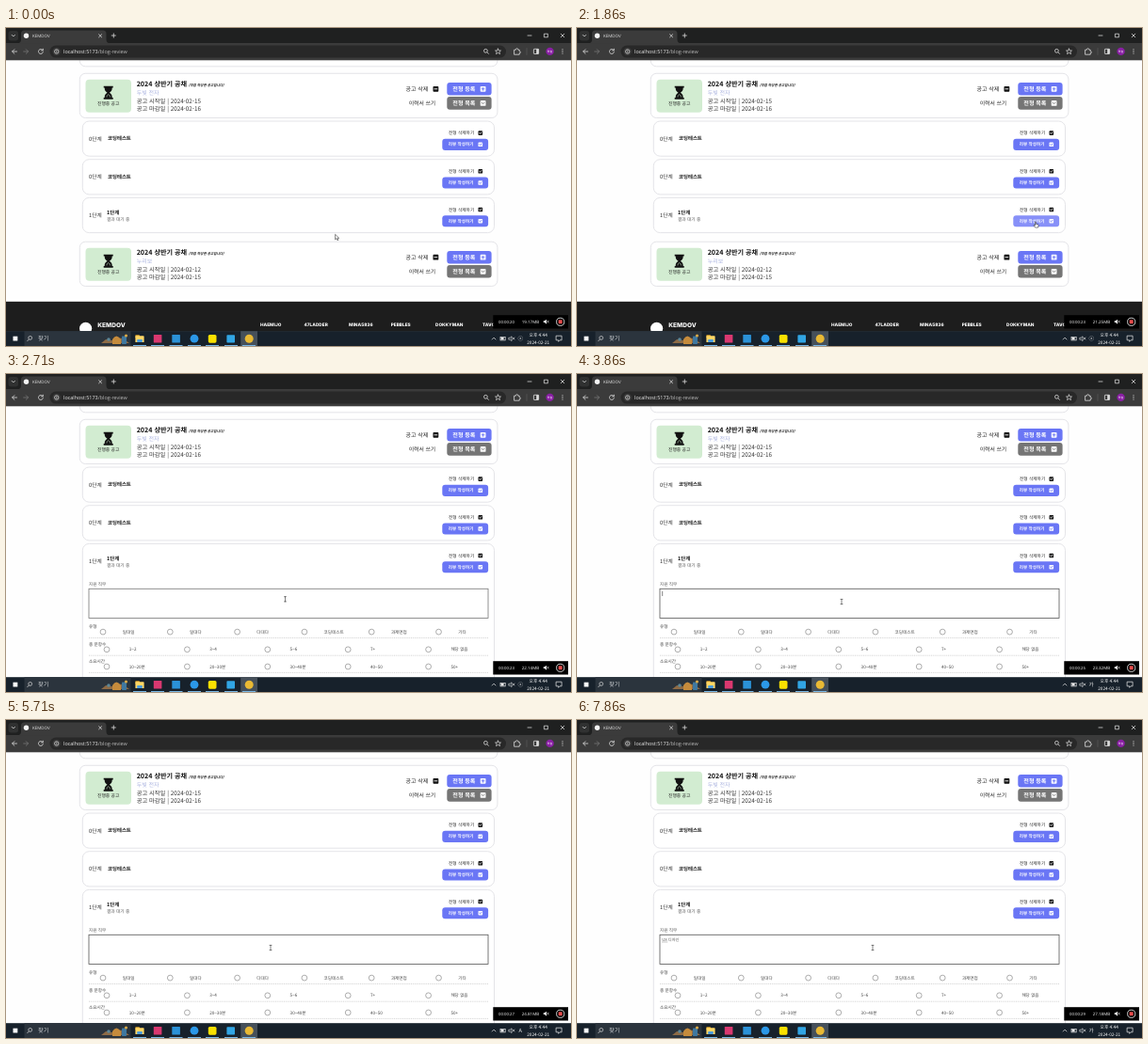
Recreate the animation shown at these times as an HTML page. Size 600 by 338 pixels, loop 8 s.

```html
<!DOCTYPE html>
<html lang="ko">
<head>
<meta charset="utf-8">
<title>Blog review</title>
<style>
html, body { margin: 0; width: 100%; height: 100%; overflow: hidden; background: #fefefe; }
svg { display: block; width: 100%; height: 100%; font-family: 'Noto Sans CJK KR', 'Noto Sans CJK', 'Noto Sans', sans-serif; }
text { white-space: pre; text-rendering: geometricPrecision; }
.inter { font-family: Inter, sans-serif; }
.ui { font-family: 'Open Sans', 'Noto Sans CJK KR', sans-serif; }
</style>
</head>
<body>
<svg id="stage" viewBox="0 0 600 338"></svg>
<script>
const BLUE = '#6a76f5', GREY = '#757575', INK = '#222', LINE = '#dedee2';
const FRAME = 1000 / 7, LOOP = 8000;

// Drawing helpers; text is centred vertically on y.
const text = (x, y, str, size, fill = INK, attrs = '') =>
  `<text x="${x}" y="${y + size * 0.36}" font-size="${size}" fill="${fill}" ${attrs}>${str}</text>`;
const rect = (x, y, w, h, fill, r = 0, attrs = '') =>
  `<rect x="${x}" y="${y}" width="${w}" height="${h}" rx="${r}" fill="${fill}" ${attrs}/>`;
const circle = (x, y, r, fill, attrs = '') =>
  `<circle cx="${x}" cy="${y}" r="${r}" fill="${fill}" ${attrs}/>`;
const line = (d, color = '#ddd', width = 0.8) =>
  `<path d="${d}" fill="none" stroke="${color}" stroke-width="${width}" stroke-linecap="round" stroke-linejoin="round"/>`;
const group = (id, body, attrs = '') => `<g id="${id}" ${attrs}>${body}</g>`;
const bold = 'font-weight="700"', medium = 'font-weight="500"', middle = 'text-anchor="middle"';
const border = `stroke="${LINE}" stroke-width=".8"`;

function icon(cx, cy, size, kind, box, ink) {
  const s = size / 2, k = s * 0.5;
  const marks = {
    minus: `M${cx - k} ${cy}h${2 * k}`,
    plus: `M${cx - k} ${cy}h${2 * k}M${cx} ${cy - k}v${2 * k}`,
    down: `M${cx - k} ${cy - k / 2}l${k} ${k}l${k} ${-k}`,
    check: `M${cx - k} ${cy}l${k * 0.7} ${k * 0.7}l${k * 1.3} ${-k * 1.4}`
  };
  return rect(cx - s, cy - s, size, size, box, 0.9) + line(marks[kind], ink, 0.9);
}

function bigButton(y, label, fill, kind) {
  return rect(468.3, y, 47.3, 13.6, fill, 3) +
    text(474.3, y + 6.8, label, 6.1, '#fff', bold) +
    icon(506.6, y + 6.8, 5.8, kind, '#fff', fill);
}

function postingCard(y, company, start, end) {
  const body = rect(78.3, 0, 443.6, 47.2, '#fff', 6, border) +
    rect(84.5, 6.5, 48.5, 35, '#d2ecd1', 4) +
    '<path d="M103.7 13.5h10v1.8h-1c0 3-1 4-2.8 5.2 1.8 1.2 2.8 2.2 2.8 5.2h1v1.8h-10v-1.8h1c0-3 1-4 2.8-5.2-1.8-1.2-2.8-2.2-2.8-5.2h-1z" fill="#111"/>' +
    line('M107 24.8c0-1.4.8-1.8 1.7-2.5.9.7 1.7 1.1 1.7 2.5', '#d2ecd1', 0.6) +
    text(108.7, 32, '진행중 공고', 4.8, INK, `${medium} ${middle}`) +
    text(138.7, 11.2, '2024 상반기 공채', 7.1, '#111', bold) +
    text(194, 12.3, '(직접 작성한 공고입니다)', 3.55, '#111', `${bold} font-style="italic"`) +
    text(138.7, 21, company, 6, '#aab3df') +
    text(138.7, 29.8, `공고 시작일 | ${start}`, 6.3, '#333') +
    text(138.7, 37.9, `공고 마감일 | ${end}`, 6.3, '#333') +
    text(424.6, 16.5, '공고 삭제', 6, INK, medium) +
    icon(456.4, 16.5, 5.8, 'minus', '#111', '#fff') +
    text(427.7, 31.6, '이력서 쓰기', 5.85, INK, medium) +
    bigButton(9.7, '전형 등록', BLUE, 'plus') +
    bigButton(24.8, '전형 목록', GREY, 'down');
  return `<g transform="translate(0 ${y})">${body}</g>`;
}

function stageRow(y, step, title, note = '', buttonId = '') {
  const titleY = note ? 15.2 : 18;
  return `<g transform="translate(0 ${y})">` +
    text(88, 18.5, step, 5.7, '#333') +
    text(note ? 107 : 108, titleY, title, 5.4, '#111', bold) +
    text(107, 23.2, note, 4.7, '#555') +
    text(470, 12.6, '전형 삭제하기', 4.7, INK, medium) +
    icon(503.8, 12.6, 4.6, 'check', '#111', '#fff') +
    rect(463.3, 18.8, 48.8, 12.1, BLUE, 3, `id="${buttonId || 'review' + Math.round(y)}"`) +
    text(469.8, 24.8, '리뷰 작성하기', 4.6, '#fff', bold) +
    icon(503.8, 24.8, 4.6, 'check', '#fff', BLUE) + '</g>';
}

function radioRow(y, label, firstX, step, options) {
  const choices = options.map((name, i) => {
    const x = firstX + i * step;
    return circle(x, y + 5.8, 2.9, '#fff', 'stroke="#777" stroke-width=".6"') +
      text(x + (step < 80 ? 20.7 : 23.8), y + 5.8, name, 4.6, '#444');
  }).join('');
  return text(88, y, label, 4.65, '#444') + choices +
    `<path d="M88 ${y + 12.2}H512" stroke="#bbb" stroke-width=".6" stroke-dasharray="1 .8"/>`;
}

const footer = () => {
  const users = [[270, 'HAEMIJO'], [316.5, '47LADDER'], [364, 'MINA5836'], [408.7, 'PEBBLES'], [456, 'DOKKYMAN'], [506, 'TAVOKI']];
  return rect(0, 290.8, 600, 32, '#1d1d1d') + circle(84.6, 319.3, 6.6, '#fff') +
    text(97.3, 315.8, 'KEMDOV', 6.5, '#fff', 'class="inter" font-weight="800"') +
    users.map(([x, name]) => text(x, 315.6, name, 4.75, '#fff', 'class="inter" font-weight="800"')).join('');
};

const closedView = () =>
  rect(81.3, 180.4, 437.2, 37.2, '#fff', 7, border) +
  postingCard(227.2, '누리보', '2024-02-12', '2024-02-15') + footer();

const openView = () =>
  rect(81.3, 180.4, 437.2, 200, '#fff', 7, border) +
  text(88, 223.5, '지원 직무', 4.6, '#555') +
  rect(88, 228.3, 424, 31.2, '#fff', 0, 'stroke="#777" stroke-width=".8" id="box"') +
  radioRow(268.3, '유형', 103, 71.3, ['일대일', '일대다', '다대다', '코딩테스트', '과제면접', '기타']) +
  radioRow(287, '총 문항수', 107, 85.4, ['1~2', '3~4', '5~6', '7+', '해당 없음']) +
  radioRow(305.2, '소요시간', 107, 85.4, ['10~20분', '20~30분', '30~40분', '40~50', '50+']) +
  group('typed', text(90.3, 233.3, '', 4.2, '#555')) +
  group('squiggle', line('M90.4 236h5.5', '#888', 0.5)) +
  group('caret', line('M90.7 231.2v4.4', '#333', 0.6));

const browser = () =>
  rect(0, 0, 600, 17, '#1f2020') + rect(0, 16, 600, 18.3, '#3b3b3b') +
  '<path d="M12 16.2q4 0 4-4V6q0-3.5 3.5-3.5H103q3.5 0 3.5 3.5v6.2q0 4 4 4z" fill="#3b3b3b"/>' +
  rect(2.5, 3, 10.6, 10.4, '#303131', 3) + line('M6.2 7.4l1.6 1.6 1.6-1.6') +
  circle(21.5, 8.3, 2.7, '#f2f2f2') + text(28, 8.3, 'KEMDOV', 4.5, '#e6e6e6', 'class="ui"') +
  line('M98.6 6.8l3 3m0-3l-3 3M112.2 8h4.2m-2.1-2.1v4.2') +
  line('M554 8h4M571.8 6.2h3.6v3.6h-3.6zM589.2 6.2l3.6 3.6m0-3.6l-3.6 3.6', '#eee', 0.7) +
  line('M11.5 25H6.7m2.2-2.3L6.6 25l2.3 2.3') +
  line('M18.7 25h4.8m-2.2-2.3l2.3 2.3-2.3 2.3', '#777') +
  line('M39 23.5a2.5 2.5 0 1 0 .4 2.1M39.3 22.2v1.7h-1.7') +
  rect(46.5, 18.6, 484.5, 12.9, '#282828', 6.4) + circle(53.7, 25, 4.2, '#3b3b3b') +
  circle(53.7, 25, 2.2, 'none', 'stroke="#ddd" stroke-width=".7"') + line('M53.7 24.8v1.2M53.7 23.8v.1', '#ddd', 0.6) +
  text(61, 25, 'localhost:5173<tspan fill="#bbb">/blog-review</tspan>', 5.45, '#eee', 'class="ui"') +
  circle(509.4, 24.3, 1.9, 'none', 'stroke="#ddd" stroke-width=".8"') + line('M510.9 25.8l1.6 1.6') +
  line('M522.5 22l.9 2h2.1l-1.6 1.4.6 2.2-2-1.2-2 1.2.6-2.2-1.6-1.4h2.1z', '#ddd', 0.7) +
  line('M540 23.2h1.4q0-1.5 1.2-1.5t1.2 1.5h1.4v1.6q1.2 0 1.2 1t-1.2 1v1.4H540z') +
  line('M553 21.5v7', '#666', 0.5) +
  rect(560.4, 22.3, 5.2, 5.2, 'none', 0.6, 'stroke="#ddd" stroke-width=".8"') + rect(563.2, 22.3, 2.4, 5.2, '#ddd') +
  circle(577.6, 24.9, 4.2, '#8a1fa5') + text(577.6, 24.9, '하늘', 3, '#fff', middle) +
  [22.8, 24.9, 27].map(y => circle(591, y, 0.6, '#ddd')).join('');

const taskbar = () => {
  const underlines = [142, 161, 180.5, 200, 219, 239, 258].map(x => rect(x - 7, 337, 14, 1, '#79b7e6')).join('');
  return rect(0, 322.2, 600, 16, '#17212b') + rect(19.5, 322.2, 113, 16, '#2b343d') +
    rect(7.5, 327.7, 4.8, 4.8, '#fff') +
    circle(25.7, 329.4, 1.9, 'none', 'stroke="#ddd" stroke-width=".7"') + line('M24.4 330.9l-1.7 1.8', '#ddd', 0.7) +
    text(34, 330, '찾기', 6.2, '#d2d5d8') +
    '<path d="M101 335l5-4 7 1 4-3 7 1 7 5z" fill="#8d6b46"/><path d="M113 336v-5q4-7 9 0v5z" fill="#c58b3c"/>' +
    rect(123, 327.5, 5, 8.5, '#3f78a0', 0.8) + circle(109, 331, 1.8, '#5c8798') + circle(127.5, 327, 1.6, '#d8a848') +
    rect(249.2, 322.2, 17.8, 16, '#46505a') + underlines +
    rect(137.4, 326.3, 4.5, 3, '#e3a92c', 0.5) + rect(137.4, 327.3, 9.2, 6.7, '#ffd766', 0.6) + rect(139.2, 331, 5.6, 3, '#4b9dde', 0.4) +
    rect(156.8, 326, 8.6, 8.6, '#d93870', 0.6) + rect(176.3, 326, 8.6, 8.6, '#2b92d8', 0.6) +
    circle(200, 330.2, 4.4, '#2b98e8') + rect(214.8, 326, 8.7, 8.7, '#fae100', 1.6) +
    rect(234.4, 326.2, 8.6, 8.4, '#31a5e4', 0.8) + circle(258.2, 330.2, 4.5, '#e9b934') +
    line('M516.2 331l1.9-1.9 1.9 1.9', '#eee', 0.7) +
    rect(525, 328.5, 5.2, 3.4, 'none', 0, 'stroke="#eee" stroke-width=".7"') + rect(525.6, 329, 3, 2.4, '#eee') +
    line('M534.2 329.2h1.2l1.6-1.4v4.8l-1.6-1.4h-1.2zM538.2 329l1.8 2m0-2l-1.8 2', '#eee', 0.6) +
    group('ime', text(546.2, 330, '', 5.6, '#f0f0f0', middle)) +
    text(565.2, 326.4, '오후 4:44', 4.75, '#fff', middle) + text(565.2, 333.9, '2024-02-21', 4.65, '#fff', middle) +
    line('M584.5 327.2h5.6v4.6h-2.2l-1.2 1.5v-1.5h-2.2z', '#eee', 0.7);
};

const recorder = () =>
  rect(517.3, 305.2, 79.7, 14.3, '#000') +
  group('clock', text(523, 312.3, '', 4.3, '#fff', 'class="ui"')) +
  group('megabytes', text(547.8, 312.3, '', 4.45, '#fff', 'class="ui"')) +
  '<path d="M570.8 311.3h1.3l1.8-1.6v5l-1.8-1.6h-1.3z" fill="#fff"/>' + line('M574.8 311.2l1.4 1.9m0-1.9l-1.4 1.9', '#fff', 0.5) +
  circle(588.7, 312.3, 4.1, 'none', 'stroke="#fff" stroke-width=".8"') + rect(586.7, 310.3, 4, 4, '#e64b4b', 0.5);

const pointers =
  group('arrow', '<path d="M0 0v5.6l1.3-1.2 1 2 .9-.4-.9-2h1.8z" fill="#fff" stroke="#111" stroke-width=".5"/>') +
  group('hand', '<path d="M-.5 0q.8-.6 1.1.3v2.1l2 .5q.6.2.5.9l-.5 2.3h-2.9l-1.8-2.2q.1-.8 1-.4l.6.5z" fill="#fff" stroke="#111" stroke-width=".5"/>') +
  group('beam', line('M-1 -2.6h2M0 -2.6v5.2M-1 2.6h2', '#333', 0.6));

document.getElementById('stage').innerHTML =
  rect(0, 0, 600, 338, '#fefefe') + rect(78.3, 0, 443.6, 40.8, '#fff', 6, border) +
  postingCard(48.3, '두빛 전자', '2024-02-15', '2024-02-16') +
  [99, 139.7].map(y => rect(81.3, y, 437.2, 37.2, '#fff', 7, border) + stageRow(y, '0단계', '코딩테스트')).join('') +
  group('closed', closedView()) + group('open', openView()) +
  stageRow(180.4, '1단계', '1단계', '결과 대기 중', 'review') +
  browser() + taskbar() + recorder() + pointers;

// [time, value] tables
const OPEN_AT = 1995, FOCUS_AT = 2840;
const path = [[0, 349.6, 219.3], [280, 349.6, 219.3], [1290, 487, 206], [2290, 487, 206], [2800, 281, 242], [7000, 281, 242], [7700, 314, 242]];
const megabyteSteps = [[0, 0], [1855, 7], [3855, 14], [5140, 17], [6425, 22], [7855, 27], [8100, 28]];
const typing = [[0, ''], [5850, 'U'], [6000, 'UX'], [6850, 'UX '], [6995, 'UX ㄷ'], [7140, 'UX 디'], [7280, 'UX 디ㅈ'], [7425, 'UX 디자'], [7570, 'UX 디자ㅇ'], [7710, 'UX 디자이'], [7850, 'UX 디자인']];
const imeModes = [[0, 'ⓧ'], [FOCUS_AT, '가'], [5425, 'A'], [6850, '가']];

const held = (table, t) => table.filter(step => step[0] <= t).pop()[1];
const ease = u => u * u * (3 - 2 * u);
function between(table, t, column, curve = u => u) {
  const i = table.findIndex(step => step[0] > t);
  if (i < 0) return table[table.length - 1][column];
  const a = table[i - 1], b = table[i];
  return a[column] + (b[column] - a[column]) * curve((t - a[0]) / (b[0] - a[0]));
}

const el = id => document.getElementById(id);
const show = (id, on) => el(id).style.display = on ? '' : 'none';
const write = (id, str) => el(id).firstChild.textContent = str;

function render(time) {
  const t = Math.floor((time + 4) / FRAME) * FRAME;
  const x = between(path, t, 1, ease), y = between(path, t, 2, ease);
  const open = t >= OPEN_AT, typed = held(typing, t);
  const onButton = x > 463 && x < 512 && y > 199 && y < 211;
  const onBox = open && y > 228;
  const pointer = onButton ? 'hand' : onBox ? 'beam' : 'arrow';

  show('closed', !open);
  show('open', open);
  show('caret', t >= FOCUS_AT && !typed && (t - FOCUS_AT) % 1000 < 500);
  show('squiggle', typed.length > 2);
  for (const id of ['arrow', 'hand', 'beam']) show(id, id === pointer);
  el(pointer).setAttribute('transform', `translate(${x} ${y})`);
  el('review').setAttribute('fill', onButton && !open ? '#8790f8' : BLUE);
  el('box').setAttribute('stroke', t >= FOCUS_AT ? '#555' : '#777');
  write('typed', typed);
  write('ime', held(imeModes, t));
  write('clock', '00:00:' + Math.floor(20.99 + t * 0.001085));
  write('megabytes', (19.17 + Math.floor(between(megabyteSteps, t, 1)) * 0.2966).toFixed(2) + 'MB');
}

const began = performance.now();
function tick() {
  render((performance.now() - began) % LOOP);
  requestAnimationFrame(tick);
}
tick();
</script>
</body>
</html>
```
